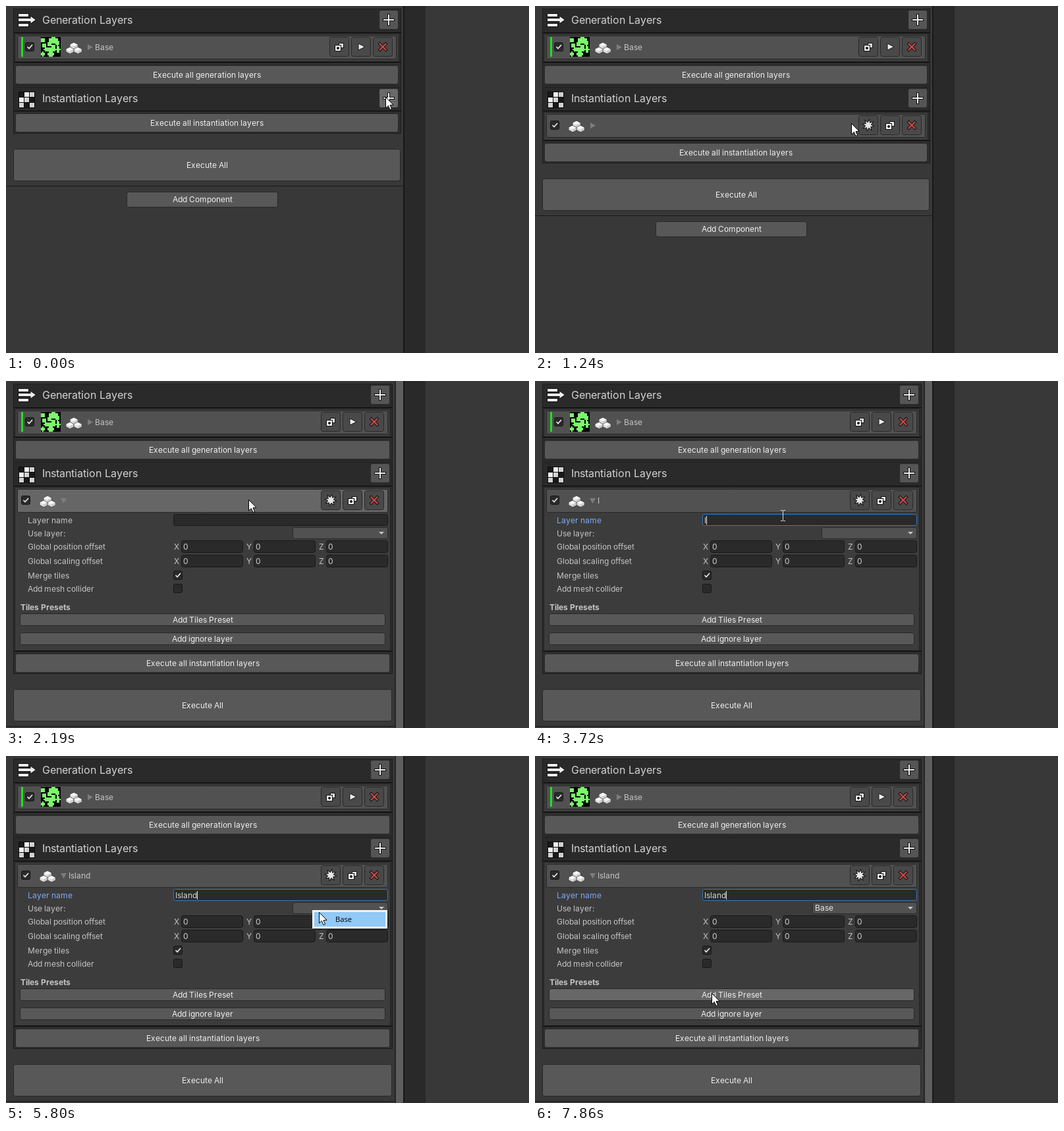
Recreate the animation shown at these times as an HTML page with a canvas. Size 794 by 527 pixels, loop 8 s.

```html
<!DOCTYPE html>
<html lang="en">
<head>
<meta charset="utf-8">
<title>Layer inspector</title>
<style>
html, body { margin: 0; width: 100%; height: 100%; overflow: hidden; background: #383838; }
canvas { display: block; }
</style>
</head>
<body>
<canvas id="stage" width="794" height="527"></canvas>
<script>
const ctx = document.getElementById('stage').getContext('2d');
const LOOP = 8000;
const UI = 'Inter, sans-serif';
const MENU = '"Open Sans", sans-serif';

// Pointer moves: start, end, number of steps, destination.
const moves = [
  [700, 970, 3, 601, 176],
  [1090, 1670, 5, 368, 180],
  [2470, 2880, 4, 376, 204],
  [4920, 5350, 4, 475, 237],
  [5930, 5930, 1, 494, 249],
  [6080, 6360, 3, 516, 249],
  [6770, 7620, 7, 280, 358],
  [7740, 7860, 2, 268, 360]
];
const clicks = [[310, 430], [970, 1090], [1930, 2070], [3020, 3160], [5500, 5650], [6630, 6770]];
const typing = [[3720, 'I'], [3870, 'Isl'], [3990, 'Isla'], [4270, 'Island']];

const between = (t, a, b) => t >= a && t < b;

function pointerAt(t) {
  let x = 576, y = 138;
  for (const [start, end, steps, tx, ty] of moves) {
    if (t < start) break;
    const gap = (end - start) / Math.max(1, steps - 1) || 1;
    const p = Math.min(steps, Math.floor((t - start) / gap + 1.001)) / steps;
    const e = p * (1.5 - p * 0.5);
    x += (tx - x) * e;
    y += (ty - y) * e;
  }
  return { x: Math.round(x), y: Math.round(y) };
}

function rect(x, y, w, h, fill) {
  ctx.fillStyle = fill;
  ctx.fillRect(x, y, w, h);
}

function box(x, y, w, h, fill, border, r = 3) {
  ctx.beginPath();
  ctx.roundRect(x + 0.5, y + 0.5, w - 1, h - 1, r);
  ctx.fillStyle = fill;
  ctx.fill();
  ctx.strokeStyle = border;
  ctx.lineWidth = 1;
  ctx.stroke();
}

// Interface text sits on whole pixels: each glyph advances by a rounded width.
function text(str, x, base, { size = 12, color = '#c4c4c4', center = false, weight = 400 } = {}) {
  ctx.font = `${weight} ${size}px ${UI}`;
  ctx.fillStyle = color;
  const advances = [...str].map(c => Math.round(ctx.measureText(c).width));
  const width = advances.reduce((sum, w) => sum + w, 0);
  let pen = center ? Math.round(x - width / 2) : x;
  [...str].forEach((c, i) => {
    ctx.fillText(c, pen, base);
    pen += advances[i];
  });
  return width;
}

function poly(points, fill, stroke, width = 1) {
  ctx.beginPath();
  points.forEach(([x, y]) => ctx.lineTo(x, y));
  ctx.closePath();
  if (fill) { ctx.fillStyle = fill; ctx.fill(); }
  if (stroke) { ctx.strokeStyle = stroke; ctx.lineWidth = width; ctx.stroke(); }
}

function at(x, y, draw) {
  ctx.save();
  ctx.translate(x, y);
  draw();
  ctx.restore();
}

function button(label, x, y, w, h, hover) {
  box(x, y, w, h, hover ? '#676767' : '#585858', '#282828');
  text(label, x + w / 2, y + Math.round(h / 2) + 4, { color: '#eeeeee', center: true });
}

function outlinedRects(rects) {
  for (const [x, y, w, h] of rects) rect(x - 1, y - 1, w + 2, h + 2, '#111');
  for (const [x, y, w, h] of rects) rect(x, y, w, h, '#eeeeee');
}

// Green islands on the map: centre and radii, in cells of two pixels.
const islands = [
  [1, 2, 2, 1.2], [9, 2, 3.5, 2.2], [12, 4, 2, 2.2], [6, 5, 2, 1.6], [2, 6, 1.8, 2],
  [5, 9, 3.4, 1.8], [9, 8, 2, 2.4], [12.5, 9, 1.6, 2.6], [7, 12.5, 3, 1.6], [1, 12.5, 1.4, 1.8]
];

const icons = {
  plus() { outlinedRects([[-8, -1, 16, 2], [-1, -8, 2, 16]]); },
  copy() {
    outlinedRects([[0, -5, 6, 6]]);
    outlinedRects([[-6, -2, 8, 8]]);
    rect(-4, 1, 4, 2, '#222');
    rect(-3, 0, 2, 4, '#222');
  },
  play() { poly([[-4, -5], [6, 0], [-4, 5]], '#eeeeee', '#161616'); },
  cross() {
    ctx.lineCap = 'square';
    for (const [width, color] of [[4.5, '#191919'], [2.2, '#cc4848']]) {
      ctx.beginPath();
      ctx.moveTo(-4.5, -4.5); ctx.lineTo(4.5, 4.5);
      ctx.moveTo(4.5, -4.5); ctx.lineTo(-4.5, 4.5);
      ctx.lineWidth = width;
      ctx.strokeStyle = color;
      ctx.stroke();
    }
  },
  burst() {
    const points = Array.from({ length: 16 }, (_, i) => {
      const r = i % 2 ? 3.8 : 7.5, a = i * Math.PI / 8 + 0.2;
      return [r * Math.cos(a), r * Math.sin(a)];
    });
    poly(points, null, '#161616', 2);
    poly(points, '#e6e6e6');
  },
  cubes() {
    for (const [x, y] of [[0, -4], [-6, 3], [6, 3]]) at(x, y, () => {
      poly([[0, -4.5], [6, -1.5], [6, 2.5], [0, 5.5], [-6, 2.5], [-6, -1.5]], '#dedede', '#3a3a3a', 0.8);
      poly([[0, -4.2], [5.7, -1.4], [0, 1.4], [-5.7, -1.4]], '#f8f8f8');
      poly([[0, 1.4], [5.7, -1.4], [5.7, 2.4], [0, 5.2]], '#cccccc');
    });
  },
  stack() {
    outlinedRects([[0, 0, 15, 4], [0, 7, 19, 4], [0, 15, 15, 4]]);
    poly([[18, 3], [26.5, 9], [18, 15]], '#eeeeee', '#111');
    rect(14, 7, 6, 4, '#eeeeee');
  },
  checker() {
    rect(-1, -1, 25, 25, '#0c0c0c');
    ['011', '110', '101'].forEach((row, j) => [...row].forEach((c, i) => {
      rect(i * 8, j * 8, 7, 7, c === '1' ? ((i + j) % 2 ? '#f2f2f2' : '#d2d2d2') : '#191919');
    }));
  },
  map() {
    rect(0, 0, 30, 30, '#000');
    for (let y = 0; y < 15; y++) for (let x = 0; x < 15; x++) {
      if (islands.some(([cx, cy, rx, ry]) => Math.hypot((x - cx) / rx, (y - cy) / ry) < 1)) {
        rect(x * 2, y * 2, 2, 2, '#7cf76c');
      }
    }
  }
};

function iconButton(name, x, y, fill = '#494949') {
  box(x, y, 30, 30, fill, '#292929');
  at(x + 15, y + 15, icons[name]);
}

function checkbox(x, y, checked) {
  box(x, y, 14, 14, '#2a2a2a', '#171717', 2);
  if (!checked) return;
  ctx.beginPath();
  ctx.moveTo(x + 3.5, y + 7); ctx.lineTo(x + 6, y + 9.5); ctx.lineTo(x + 11, y + 4);
  ctx.lineCap = 'butt';
  ctx.lineWidth = 1.7;
  ctx.strokeStyle = '#e8e8e8';
  ctx.stroke();
}

function foldout(x, y, open) {
  poly(open ? [[x, y], [x + 9, y], [x + 4.5, y + 8]] : [[x, y], [x + 8, y + 4.5], [x, y + 9]], '#7d7d7d');
}

function sectionFrame(y, bottom, right, title, icon, hover) {
  rect(11, y, right - 11, bottom - y, '#1c1c1c');
  rect(12, y + 1, right - 13, bottom - y - 2, '#2d2d2d');
  rect(12, y + 1, right - 13, 35, '#2a2a2a');
  rect(12, y + 36, right - 12, 1, '#080808');
  at(icon === 'stack' ? 19 : 20, y + 8, icons[icon]);
  text(title, 55, y + 23, { size: 16, color: '#d2d2d2' });
  iconButton('plus', right - 34, y + 2, hover ? '#696969' : '#555555');
}

function layerBox(y, bottom, right, fill) {
  box(13, y, right - 16, bottom - y, '#3c3c3c', '#222', 1);
  box(17, y + 3, right - 24, 36, fill, '#292929', 2);
  rect(12, bottom, right - 12, 1, '#080808');
}

function numberRow(label, y, base) {
  text(label, 33, base);
  ['X', 'Y', 'Z'].forEach((axis, i) => {
    text(axis, 255 + i * 110, base);
    box(266 + i * 110, y, 94, 19, '#2a2a2a', '#181818');
    text('0', 269 + i * 110, base, { color: '#d2d2d2' });
  });
}

function settings(s) {
  text('Layer name', 33, 216, { color: s.focused ? '#7fa9f2' : '#c4c4c4' });
  box(254, 202, 326, 18, '#2a2a2a', s.focused ? '#3a79bb' : '#181818');
  const width = text(s.name, 257, 216, { color: '#d2d2d2' });
  if (s.focused) rect(257 + width, 205, 1, 13, '#dddddd');

  text('Use layer:', 33, 236);
  const left = s.chosen ? 421 : 435;
  box(left, 222, 580 - left, 18, '#515151', '#2b2b2b');
  if (s.chosen) text('Base', 425, 235, { color: '#e4e4e4' });
  poly([[566, 229], [574, 229], [570, 233]], '#c8c8c8');

  numberRow('Global position offset', 242, 256);
  numberRow('Global scaling offset', 264, 278);
  text('Merge tiles', 33, 300);
  checkbox(254, 288, true);
  text('Add mesh collider', 33, 320);
  checkbox(254, 308, false);
  text('Tiles Presets', 22, 348, { weight: 700 });
  button('Add Tiles Preset', 21, 353, 555, 19, s.overPreset);
  button('Add ignore layer', 21, 382, 555, 19);
}

function popup(x, y, w, h, items, active) {
  rect(x + 2, y + 2, w, h, 'rgba(0,0,0,.35)');
  rect(x, y, w, h, '#fafafa');
  rect(x + 1, y + 1, w - 2, h - 2, '#f0f0f0');
  ctx.font = `11.2px ${MENU}`;
  items.forEach((label, i) => {
    if (i === active) rect(x + 3, y + 3 + i * 22, w - 6, 22, '#91c9f7');
    ctx.fillStyle = '#000';
    ctx.fillText(label, x + 35, y + 18 + i * 22);
  });
}

function inspector(s) {
  const right = s.open ? 587 : 600;
  const shift = s.open ? 251 : s.added ? 45 : 0;

  rect(0, 0, 794, 527, '#383838');

  sectionFrame(4, 122, right, 'Generation Layers', 'stack');
  layerBox(42, 85, right, '#515151');
  rect(23, 47, 3, 30, '#1fe01f');
  checkbox(29, 55, true);
  at(53, 47, icons.map);
  at(103, 64, icons.cubes);
  foldout(124, 58, false);
  text('Base', 135, 67);
  ['copy', 'play', 'cross'].forEach((name, i) => iconButton(name, right - 109 + i * 33, 47));
  button('Execute all generation layers', 14, 90, right - 18, 29);

  sectionFrame(123, 194 + shift, right, 'Instantiation Layers', 'checker', s.overPlus);
  if (s.added) {
    layerBox(161, s.open ? 410 : 204, right, s.overHeader ? '#666666' : '#515151');
    checkbox(23, 174, true);
    at(63, 183, icons.cubes);
    foldout(s.open ? 83 : 84, s.open ? 178 : 177, s.open);
    text(s.name, 95, 186);
    ['burst', 'copy', 'cross'].forEach((name, i) => iconButton(name, right - 109 + i * 33, 166));
  }
  if (s.open) settings(s);
  button('Execute all instantiation layers', 14, 163 + shift, right - 18, 29);

  button('Execute All', 11, 217 + shift, right - 12, 49);
  rect(0, 273 + shift, s.open ? 590 : 603, 1, '#1a1a1a');
  button('Add Component', 183, 282 + shift, 230, 24);

  if (s.open) {
    rect(590, 0, 2, 527, '#262626');
    rect(592, 0, 11, 527, '#5e5e5e');
  }
  rect(603, 0, 34, 527, '#292929');
  rect(603, 0, 2, 527, '#191919');
}

function drawPointer({ x, y }, beam, pressed) {
  if (pressed) {
    for (const [r, color] of [[10, '#1b2530'], [9, 'rgba(255,255,255,.8)']]) {
      ctx.beginPath();
      ctx.arc(x, y, r, 0, Math.PI * 2);
      ctx.lineWidth = 1.2;
      ctx.strokeStyle = color;
      ctx.stroke();
    }
  }
  at(x, y, () => {
    if (beam) {
      rect(0, -7, 1, 15, '#dddddd');
      for (const end of [-8, 8]) {
        rect(-3, end, 3, 1, '#dddddd');
        rect(1, end, 3, 1, '#dddddd');
      }
    } else {
      poly([[0.5, 0.5], [0.5, 17], [4.3, 13.4], [7, 19.5], [9.6, 18.4], [7, 12.5], [12, 12.2]], '#fff', '#000');
    }
  });
}

function draw(t) {
  const pointer = pointerAt(t);
  const typed = typing.filter(([start]) => t >= start).pop();
  const state = {
    added: t >= 1090,
    open: t >= 2190,
    focused: t >= 3020,
    chosen: t >= 6770,
    name: typed ? typed[1] : '',
    overPlus: t < 1090,
    overHeader: t >= 2190 && pointer.y < 199,
    overPreset: t >= 6770 && pointer.y >= 354
  };
  inspector(state);
  if (between(t, 430, 1090)) {
    const active = pointer.x < 580 ? -1 : pointer.y < 165 ? 0 : 1;
    popup(576, 140, 185, 50, ['InstantiateObjects', 'InstantiateTiles'], active);
  }
  if (between(t, 5650, 6770)) popup(465, 234, 114, 28, ['Base'], t < 5800 ? -1 : 0);
  const beam = t >= 3020 && pointer.y < 220;
  drawPointer(pointer, beam, clicks.some(([a, b]) => between(t, a, b)));
}

function tick() {
  draw(performance.now() % LOOP);
  requestAnimationFrame(tick);
}
tick();
</script>
</body>
</html>
```
